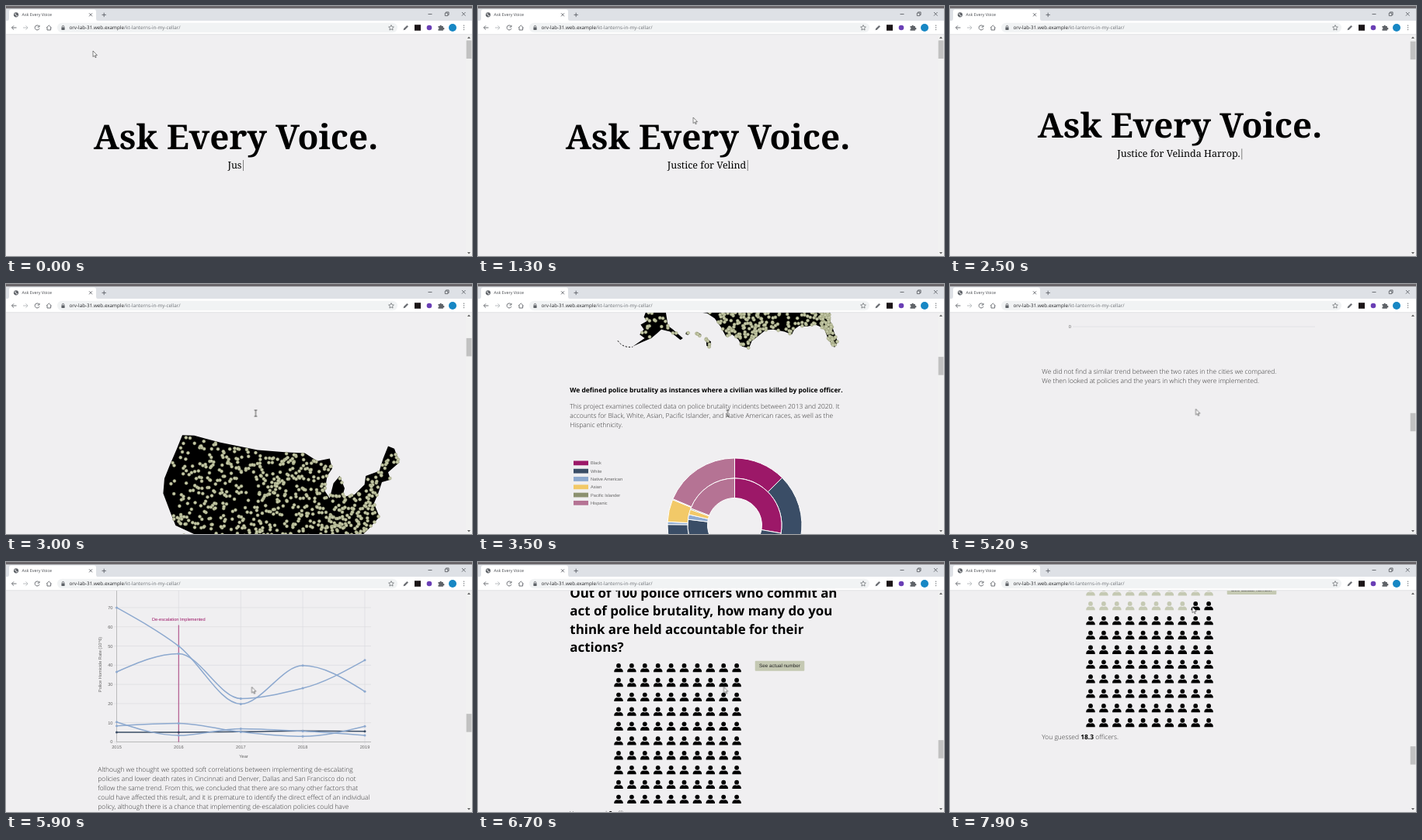
Animation of 600x323 px, one loop 8000 ms. Source, as an HTML page:

```html
<!DOCTYPE html>
<html lang="en">
<head>
<meta charset="utf-8">
<title>Ask Every Voice</title>
<style>
  @property --scroll { syntax: "<number>"; inherits: true; initial-value: 0; }

  html, body { margin: 0; width: 100%; height: 100%; overflow: hidden; background: #f0eff1; }
  svg { display: block; width: 600px; height: 323px; animation: scroll 8s linear infinite; }
  text { text-rendering: geometricPrecision; white-space: pre; }

  #page { transform: translateY(calc(var(--scroll) * -1px)); }
  #thumb { transform: translateY(calc(var(--scroll) * 1px / 12.3)); }
  #pointer { animation: move 8s linear infinite; }
  #arrow { animation: arrow 8s step-end infinite; }
  #beam { animation: beam 8s step-end infinite; }

  .title { font: 700 44px "Noto Serif", serif; text-anchor: middle; }
  .typed { font: 400 12.5px "Noto Serif", serif; }
  .head { font: 700 16.9px "Open Sans", sans-serif; }
  .body { font: 300 8.45px "Open Sans", sans-serif; fill: #333; }
  .strong { font: 700 8.45px "Open Sans", sans-serif; }
  .label { font: 5.65px "Liberation Sans", sans-serif; fill: #666; }
  .ui { font: 5.4px "Open Sans", sans-serif; fill: #45484d; }
  .url { font: 6.3px "Open Sans", sans-serif; fill: #202124; }
  .icon { fill: none; stroke: #5f6368; stroke-width: .9; }
  .grid { stroke: #dcdce0; stroke-width: .7; }
  .axis { stroke: #aaa; stroke-width: .7; }
  .picked { fill: #c5c9b3; }

  @keyframes scroll {
    0%, 30% { --scroll: 0; }
    31.25% { --scroll: 14; }
    43.75% { --scroll: 610; }
    55% { --scroll: 1090; }
    73.75% { --scroll: 1865; }
    83.75% { --scroll: 2283; }
    90%, 100% { --scroll: 2382; }
  }
  @keyframes move {
    0%, 4% { transform: translate(112px, 58px); animation-timing-function: ease-in-out; }
    22%, 46% { transform: translate(321.5px, 167px); }
    47%, 90.6% { transform: translate(316.5px, 161.5px); animation-timing-function: ease-in-out; }
    98%, 100% { transform: translate(312px, 58px); }
  }
  @keyframes arrow { 0% { opacity: 1; } 20% { opacity: 0; } 46.5%, 100% { opacity: 1; } }
  @keyframes beam { 0% { opacity: 0; } 20% { opacity: 1; } 46.5%, 100% { opacity: 0; } }
</style>
</head>
<body>
<svg id="stage" viewBox="0 0 600 323">
  <defs>
    <g id="person">
      <circle cy="-2.9" r="2.9"/>
      <path d="M-5.7 5.5V4Q-5.2 .9 -2 .7Q0 1.5 2 .7Q5.2 .9 5.7 4V5.5Z"/>
    </g>
  </defs>
  <rect width="600" height="323" fill="#f0eff1"/>

  <g id="page">
    <text class="title" x="296" y="185">Ask Every Voice.</text>
    <text class="typed" id="typed" y="209.5"></text>
    <path id="caret" d="M0 199V213" stroke="#666" stroke-width=".8"/>
  </g>

  <g id="scrollbar">
    <rect x="592" y="37" width="8" height="286" fill="#f1f1f1"/>
    <path d="M594 42L596 39.5L598 42ZM594 318L596 320.5L598 318Z" fill="#606060"/>
    <rect id="thumb" x="592.7" y="44.5" width="6.8" height="23.5" fill="#c1c1c1"/>
  </g>

  <g id="chrome">
    <rect width="600" height="37" fill="#fff"/>
    <rect width="600" height="19" fill="#dee1e6"/>
    <rect width="600" height="3.2" fill="#6b686c"/>
    <path d="M2 19Q4 19 4 16V7Q4 4.5 6.5 4.5H113.5Q116 4.5 116 7V16Q116 19 118 19Z" fill="#fff"/>
    <circle cx="13" cy="11.3" r="3.1" fill="#5f6368"/>
    <path d="M10.6 10.4Q13 9.3 12.8 11.5T15 12.6" fill="none" stroke="#fff" stroke-width=".8"/>
    <text class="ui" x="20.5" y="13.2">Ask Every Voice</text>
    <path class="icon" d="M107 9.3l4 4m0-4l-4 4M123.5 11.4h5.4m-2.7-2.7v5.4M543.5 10.5h5M565.3 9h3.6v3.6h-3.6ZM566.5 9v-1.1h3.6v3.6h-1.1M587 8l4.6 4.6m0-4.6l-4.6 4.6"/>
    <path class="icon" d="M13.5 28h-6m2.5-2.6L7.4 28L10 30.6M42.6 26.2A3 3 0 1 0 43 29M43 24.8v2.3h-2.4M52 28.2L55.3 25L58.6 28.2M53 27.5V31H57.6V27.5"/>
    <path class="icon" style="stroke:#b5b8bc" d="M22 28h6m-2.5-2.6L28.1 28L25.5 30.6"/>
    <rect x="66" y="21.8" width="438" height="12.4" rx="6.2" fill="#f1f3f4"/>
    <rect x="71.4" y="27.4" width="4.2" height="3.5" rx=".4" fill="#5f6368"/>
    <path class="icon" d="M72.3 27.6v-1a1.2 1.2 0 0 1 2.4 0v1"/>
    <text class="url" x="81.5" y="30.2">orv-lab-31.web.example<tspan fill="#6f7378">/kt-lanterns-in-my-cellar/</tspan></text>
    <path class="icon" style="stroke-width:.7" d="M496 24.6l1 2.2 2.4.3-1.8 1.6.5 2.4-2.1-1.2-2.1 1.2.5-2.4-1.8-1.6 2.4-.3Z"/>
    <path d="M511.6 31.3l.6-2.2 4.2-4.2 1.6 1.6-4.2 4.2Z" fill="#6a6d72"/>
    <rect x="526" y="24.2" width="8" height="7.6" fill="#1b1517"/>
    <circle cx="545" cy="28" r="3.3" fill="#6a3fb5"/>
    <path d="M556.5 26h2a1.2 1.2 0 1 1 2.4 0h2v2a1.2 1.2 0 1 1 0 2.3v1.5h-6.4v-2a1 1 0 1 0 0-2Z" fill="#5f6368"/>
    <circle cx="575" cy="28" r="5" fill="#1787c4"/>
    <path d="M589.6 25.2h.01m0 2.7h.01m0 2.7h.01" stroke="#5f6368" stroke-width="1.3" stroke-linecap="round"/>
    <path d="M0 36.7H600" stroke="#d6d7da" stroke-width=".7"/>
  </g>

  <g id="pointer">
    <path id="arrow" d="M0 0V7.6L1.8 6L3 8.7L4.2 8.2L3 5.6H5.4Z" fill="#fff" stroke="#333" stroke-width=".6"/>
    <path id="beam" d="M-1.8 -4H1.8M0 -4V4M-1.8 4H1.8" fill="none" stroke="#333" stroke-width=".8"/>
  </g>
</svg>

<script>
const $ = id => document.getElementById(id);
const page = $("page");
const add = html => page.insertAdjacentHTML("beforeend", html);

const text = (cls, x, y, str, attrs = "") => `<text class="${cls}" x="${x}" y="${y}" ${attrs}>${str}</text>`;
const block = (cls, y, pitch, lines) => add(lines.map((line, i) => text(cls, 118.3, y + i * pitch, line)).join(""));
const para = (y, ...lines) => block("body", y, 11.85, lines);
const strong = (y, ...lines) => block("strong", y, 11.85, lines);
const head = (y, ...lines) => block("head", y, 23.4, lines);
const line = (cls, x1, y1, x2, y2) => `<path class="${cls}" d="M${x1} ${y1}L${x2} ${y2}"/>`;
const dot = (x, y, r, fill, attrs = "") => `<circle cx="${x}" cy="${y}" r="${r}" fill="${fill}" ${attrs}/>`;

let seed = 7;
const random = () => (seed = seed * 16807 % 2147483647) / 2147483647;

const PLUM = "#9c1868", NAVY = "#3a4d66", BLUE = "#8da9cf", GOLD = "#f2c968", OLIVE = "#8c9170", ROSE = "#b57394";

// Map with incident dots
function drawMap() {
  const states = `M97 15L145 17 250 45 400 75 520 85 590 88 640 120 690 110 700 150 680 180 670 240 690 270
    705 210 730 180 750 230 740 265 790 255 830 215 835 180 890 160 905 110 925 60 950 70 970 125 925 165
    935 195 900 205 885 250 868 290 890 345 850 390 810 430 800 470 820 530 835 570 822 592 797 560 780 515
    745 500 710 508 680 505 660 520 650 540 620 528 575 520 545 522 510 550 490 565 478 595 450 588 435 560
    410 540 385 548 365 510 340 475 310 455 250 445 190 435 145 415 70 380 50 330 20 250 25 190 45 140 75 70Z`;
  const alaska = `M70 430L100 415 140 430 152 505 172 520 212 555 202 562 160 528 125 520 108 535 85 555 45 572
    10 588 58 555 38 540 55 520 42 500 68 485 55 470Z`;
  add(`<g id="map" transform="translate(196 503) scale(.32)">
    <path d="${states}"/><path d="${alaska}"/>
    <path d="M225 530l12 4 -4 8 -10 -4ZM268 530l18 10 -6 6 -14 -8ZM305 555l20 14 -4 24 -14 -8Z"/>
    <path d="M-50 565Q-30 595 10 590" fill="none" stroke="#000" stroke-width="3" stroke-dasharray="7 6"/></g>`);
  const map = $("map");
  const [land, north, islands] = map.querySelectorAll("path");
  const scatter = (shape, count, x, y, w, h, bias = 1) => {
    const p = $("stage").createSVGPoint();
    let dots = "";
    while (count > 0) {
      p.x = x + w * random() ** bias;
      p.y = y + h * random();
      if (!shape.isPointInFill(p)) continue;
      dots += dot(p.x.toFixed(1), p.y.toFixed(1), 6.3, "#c5c9a8", 'stroke="#8f946f" stroke-width="1.5"');
      count--;
    }
    return dots;
  };
  map.insertAdjacentHTML("beforeend", scatter(land, 800, 0, 0, 975, 610, .7) + scatter(land, 80, 360, 440, 200, 160)
    + scatter(land, 60, 770, 450, 70, 150) + scatter(north, 24, 0, 410, 215, 180) + scatter(islands, 9, 220, 525, 110, 70));
}

// Ring drawn from slice end angles in degrees, clockwise from the top
function ring(cx, cy, inner, outer, ends) {
  const at = (r, deg) => {
    const a = deg * Math.PI / 180;
    return `${(cx + r * Math.sin(a)).toFixed(2)} ${(cy - r * Math.cos(a)).toFixed(2)}`;
  };
  const colors = [PLUM, NAVY, BLUE, GOLD, OLIVE, ROSE];
  return ends.map((end, i) => {
    const start = i ? ends[i - 1] : 0, big = +(end - start > 180);
    return `<path d="M${at(outer, start)}A${outer} ${outer} 0 ${big} 1 ${at(outer, end)}L${at(inner, end)}
      A${inner} ${inner} 0 ${big} 0 ${at(inner, start)}Z" fill="${colors[i]}" stroke="#fff" stroke-width="1"/>`;
  }).join("");
}

function drawDonut() {
  const groups = [["Black", PLUM], ["White", NAVY], ["Native American", BLUE], ["Asian", GOLD], ["Pacific Islander", OLIVE], ["Hispanic", ROSE]];
  add(groups.map(([name, color], i) => {
    const y = 839 + i * 10.3;
    return `<rect x="123" y="${y}" width="19" height="5.8" fill="${color}"/>` + text("label", 145, y + 5, name);
  }).join(""));
  add(ring(330.5, 922, 60.5, 86.5, [45, 270.5, 272.8, 292.3, 293, 359.99]));
  add(ring(330.5, 922, 35, 60.5, [100, 277, 283, 289.5, 291, 359.99]));
}

function drawCityChart() {
  const y = v => 1559 - v * 7.4;
  let out = "";
  for (let v = 0; v <= 20; v += 5) {
    out += line("grid", 158, y(v), v === 20 ? 298 : 470, y(v)) + text("label", 156, y(v) + 2, v, 'text-anchor="end"');
  }
  [["Police Killing Rate", PLUM, 1401], ["Violent Crime Rate", OLIVE, 1410.5]].forEach(([name, color, ly]) => {
    out += dot(301, ly, 1.6, color) + text("label", 310, ly + 2.2, name);
  });
  for (let i = 0; i < 40; i++) {
    const x = 164 + i * 7.7;
    out += dot(x, y(11 - i * .22 + random()), 1.5, PLUM) + dot(x, y(2 + random() * 13), 1.5, OLIVE);
  }
  add(out);
}

// Monotone curve through evenly spaced points
function curve(xs, ys) {
  const d = ys.slice(1).map((y, i) => y - ys[i]), last = d.length;
  const m = ys.map((_, i) => d[i - 1] * d[i] > 0 ? 2 * d[i - 1] * d[i] / (d[i - 1] + d[i]) : 0);
  m[0] = (3 * d[0] - m[1]) / 2;
  m[last] = (3 * d[last - 1] - m[last - 1]) / 2;
  return d.reduce((path, _, i) => {
    const h = (xs[i + 1] - xs[i]) / 3;
    return path + `C${xs[i] + h} ${ys[i] + m[i] / 3} ${xs[i + 1] - h} ${ys[i + 1] - m[i + 1] / 3} ${xs[i + 1]} ${ys[i + 1]}`;
  }, `M${xs[0]} ${ys[0]}`);
}

function drawYearChart() {
  const xs = [142.5, 222.3, 302.3, 382.1, 462], y = v => 2098 - v * 2.479;
  const series = [
    [[5, 5, 5.3, 5.7, 5.5], NAVY],
    [[70, 50, 19.8, 39.8, 26.3], BLUE],
    [[36.5, 46, 22.6, 28, 42.6], BLUE],
    [[10.4, 3.4, 6.9, 5.6, 3.4], BLUE],
    [[8.4, 9.7, 5.2, 2.9, 8.2], BLUE]
  ];
  let out = "";
  for (let v = 0; v <= 80; v += 10) {
    out += line("grid", 139, y(v), 470, y(v)) + text("label", 137.5, y(v) + 2, v, 'text-anchor="end"');
  }
  xs.forEach((x, i) => {
    out += line("grid", x, y(80), x, 2101) + text("label", x, 2107, 2015 + i, 'text-anchor="middle"');
  });
  out += line("axis", 142.5, y(80), 142.5, 2098) + line("axis", 142.5, 2098, 470, 2098);
  out += text("label", 306, 2118.6, "Year", 'text-anchor="middle"');
  out += text("label", 0, 0, "Police Homicide Rate (10^6)", 'text-anchor="middle" transform="translate(123 1998) rotate(-90)"');
  out += `<path d="M222.3 1947V2098" stroke="${PLUM}" stroke-width=".8"/>`;
  out += text("label", 222.3, 1942, "De-escalation Implemented", `text-anchor="middle" style="fill:${PLUM}"`);
  series.forEach(([values, color]) => {
    const ys = values.map(y);
    out += `<path d="${curve(xs, ys)}" fill="none" stroke="${color}" stroke-width="1.5"/>`;
    out += xs.map((x, i) => dot(x, ys[i], 1.5, color)).join("");
  });
  add(out);
}

const PITCH_X = 16.9, PITCH_Y = 18.85, GRID_X = 181, GRID_Y = 2420;
function drawPeople() {
  for (let i = 0; i < 100; i++) {
    add(`<use href="#person" x="${GRID_X + i % 10 * PITCH_X}" y="${GRID_Y + Math.floor(i / 10) * PITCH_Y}"/>`);
  }
  add(`<rect x="356.7" y="2411" width="63.6" height="13" rx="1" fill="#c5c9b3"/>`);
  add(text("label", 388.5, 2419.7, "See actual number", 'text-anchor="middle" style="font-size:6.3px;fill:#222"'));
  add(text("body", 118.3, 2611, 'You guessed <tspan id="guess" fill="#000" font-weight="700">0</tspan> officers.'));
}

drawMap();
strong(751, "We defined police brutality as instances where a civilian was killed by police officer.");
para(771.6, "This project examines collected data on police brutality incidents between 2013 and 2020. It",
  "accounts for Black, White, Asian, Pacific Islander, and Native American races, as well as the", "Hispanic ethnicity.");
drawDonut();
para(1112.5, "The outer ring shows the population and the inner ring shows deaths by race.",
  "Among those killed by police, Black people make up a large share of the deaths,",
  "more than double the rate of the population percentage. Additionally, Native Americans and",
  "Pacific Islanders make up a small percentage of the total population, yet their death rates are",
  "unproportionally high, more than three times the size of their population.");
strong(1180.5, "This highlights the disproportionate impact of police brutality on communities of", "color in comparison to other races.");
para(1212.3, "For more exploration, try selecting the colors of the legend to include or exclude racial groups", "for an accurate visual experience.");
head(1251, "What contributes to high rates of police", "brutality?");
para(1302, "Our exploration encountered several stops where we visualized graphs based on predicted",
  "causations to see the trends debunked our hypotheses. In this graph, we explored the",
  "relationship between police homicide rates and violent crime rates in cities across the country",
  "expecting a similar trend between the two data points.");
drawCityChart();
para(1620, "We did not find a similar trend between the two rates in the cities we compared.",
  "We then looked at policies and the years in which they were implemented.");
drawYearChart();
para(2137, "Although we thought we spotted soft correlations between implementing de-escalating",
  "policies and lower death rates in Cincinnati and Denver, Dallas and San Francisco do not",
  "follow the same trend. From this, we concluded that there are so many other factors that",
  "could have affected this result, and it is premature to identify the direct effect of an individual",
  "policy, although there is a chance that implementing de-escalation policies could have",
  "contributed to lower rates.");
head(2329, "Out of 100 police officers who commit an", "act of police brutality, how many do you", "think are held accountable for their", "actions?");
drawPeople();

const LOOP = 8000, HOVER_START = 7250, PHRASE = "Justice for Velinda Harrop.";
const people = page.querySelectorAll("use");
let shown = -1, guessed = -1;

function type(t) {
  const count = Math.min(PHRASE.length, 3 + Math.floor(t / 85));
  if (count === shown) return;
  shown = count;
  const typed = $("typed");
  typed.textContent = PHRASE.slice(0, count);
  const width = typed.getComputedTextLength(), left = 295.5 - (width + 2) / 2;
  typed.setAttribute("x", left);
  $("caret").setAttribute("transform", `translate(${left + width + 2})`);
}

// The guess follows the pointer over the grid of people
function hover(t) {
  let guess = 0;
  if (t >= HOVER_START) {
    const tip = new DOMMatrix(getComputedStyle($("pointer")).transform);
    const scroll = +getComputedStyle(page).getPropertyValue("--scroll");
    const row = Math.floor((tip.f + scroll - GRID_Y) / PITCH_Y + .5);
    guess = Math.max(0, row * 10 + (tip.e - GRID_X) / PITCH_X + .55);
  }
  if (guess === guessed) return;
  guessed = guess;
  $("guess").textContent = guess ? guess.toFixed(1) : "0";
  people.forEach((person, i) => person.classList.toggle("picked", i < Math.floor(guess)));
}

let start;
function frame(now) {
  start ??= now;
  const t = (now - start) % LOOP;
  type(t);
  hover(t);
  requestAnimationFrame(frame);
}
type(0);
requestAnimationFrame(frame);
</script>
</body>
</html>
```
